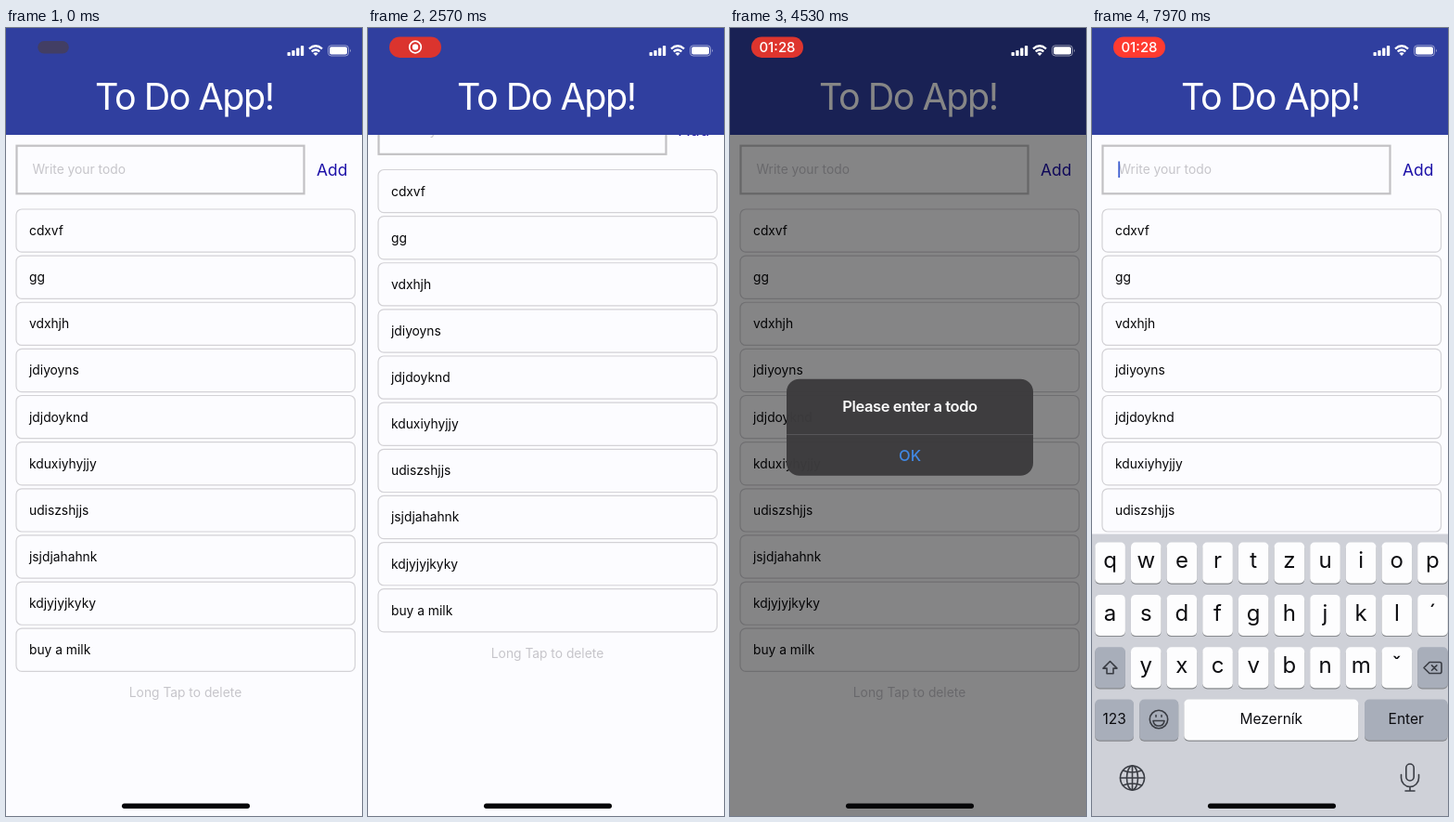
Recreate the animation shown at these times as an HTML page. Size 384 by 848 pixels, loop 8000 ms.

```html
<!DOCTYPE html>
<html lang="en">
<head>
<meta charset="utf-8">
<title>To Do App</title>
<style>
  html, body { margin: 0; width: 100%; height: 100%; overflow: hidden; background: #fcfcff; }
  svg { display: block; width: 100%; height: 100%; }
  text { font: 13.8px Inter, Roboto, sans-serif; white-space: pre; }
  .mid { text-anchor: middle; }

  .title { font-size: 39.5px; font-weight: 400; letter-spacing: -1.5px; fill: #fff; }
  .input { fill: none; stroke: #c2c1c4; stroke-width: 2.2; }
  .hint { fill: #c6c5ca; }
  .add { font-size: 17.4px; fill: #1c10a8; }
  .item { fill: none; stroke: #d3d2d6; stroke-width: 1.2; }
  .label { fill: #060608; }

  .time { font-size: 15px; font-weight: 500; fill: #fff; }
  .alert text { font-size: 16.5px; }
  .message { font-weight: 600; letter-spacing: -.4px; fill: #fff; }
  .ok { font-weight: 500; fill: #3f88e6; }
  .key { fill: #fdfdfe; }
  .grey { fill: #a8aeba; }
  .letter { font-size: 24px; fill: #0c0c10; }
  .word { font-size: 15.5px; fill: #0c0c10; }
  .icon { fill: none; stroke: #3a3d44; stroke-width: 1.6; stroke-linejoin: round; stroke-linecap: round; }
</style>
</head>
<body>
<svg viewBox="0 0 384 848" preserveAspectRatio="none">
  <rect width="384" height="848" fill="#fcfcff"/>

  <g id="content">
    <rect class="input" x="11.5" y="126.7" width="310" height="51.6"/>
    <text class="hint" x="28.5" y="157.3">Write your todo</text>
    <rect id="caret" x="28.3" y="143.5" width="1.8" height="17.5" fill="#3f5fd0"/>
    <text class="add mid" x="351.7" y="158.8">Add</text>
    <g id="items"></g>
    <text class="hint mid" x="193.5" y="720.3">Long Tap to delete</text>
  </g>

  <rect width="384" height="115" fill="#303f9f"/>
  <text class="title mid" x="192.3" y="87.8">To Do App!</text>

  <rect id="shade" width="384" height="848"/>

  <g id="alert" class="alert">
    <rect x="61" y="377.7" width="266" height="104" rx="13.8" fill="#3c3b3d"/>
    <rect x="61" y="437" width="266" height=".9" fill="#5a595c"/>
    <text class="message mid" x="194" y="413.2">Please enter a todo</text>
    <text class="ok mid" x="194" y="466.3">OK</text>
  </g>

  <g id="keyboard">
    <rect y="544" width="384" height="304" fill="#cfd1d8"/>
    <g id="keys"></g>
    <path class="icon" d="M19.5 681l-7.5 7.6h4v5.6h7v-5.6h4z"/>
    <path class="icon" d="M364 682h11q2 0 2 2v8q0 2-2 2h-11l-6-6zM366.5 685.3l5.4 5.4m0-5.4l-5.4 5.4"/>
    <g class="icon">
      <circle cx="72" cy="743.5" r="9.7"/>
      <path d="M66 745h12q-.8 5.5-6 5.5t-6-5.5zM69 739v1.8M75 739v1.8"/>
    </g>
    <g class="icon">
      <circle cx="43.5" cy="806.5" r="13"/>
      <ellipse cx="43.5" cy="806.5" rx="6" ry="13"/>
      <path d="M43.5 793.5v26M30.5 806.5h26M33.5 798.5q10 4 20 0M33.5 814.5q10-4 20 0"/>
      <rect x="338.8" y="791.5" width="8.4" height="18" rx="4.2"/>
      <path d="M333.5 803v3.5a9.5 9.5 0 0 0 19 0v-3.5M343 816v4.5M338 820.5h10"/>
    </g>
  </g>

  <g fill="#fff">
    <rect x="303.5" y="26" width="3.3" height="4" rx=".8"/>
    <rect x="308.3" y="24" width="3.3" height="6" rx=".8"/>
    <rect x="313.1" y="21.5" width="3.3" height="8.5" rx=".8"/>
    <rect x="317.9" y="19" width="3.3" height="11" rx=".8"/>
    <path d="M334 30l-2.6-2.7q2.6-2 5.2 0z"/>
    <path d="M329.7 25.4q4.3-3.7 8.6 0M327 22.3q7-6 14 0" fill="none" stroke="#fff" stroke-width="2.3"/>
    <rect x="347.5" y="18.8" width="22" height="11.2" rx="3.4" fill="none" stroke="#fff" stroke-opacity=".5"/>
    <rect x="349" y="20.3" width="19" height="8.2" rx="2"/>
    <path d="M371 22.5q1.8 1.9 0 3.8z" opacity=".6"/>
  </g>

  <g id="pill">
    <rect id="pillBody" x="23" y="9.5" width="56" height="22.4" rx="11.2"/>
    <g id="record">
      <circle cx="51" cy="20.5" r="6.3" fill="none" stroke="#fff" stroke-width="1.7"/>
      <circle cx="51" cy="20.5" r="3.2" fill="#fff"/>
    </g>
    <text id="clock" class="time mid" x="51" y="26">01:28</text>
  </g>

  <rect x="125" y="834.6" width="138" height="5.3" rx="2.65" fill="#060608"/>
</svg>

<script>
const LOOP = 8000;
const KEYBOARD_AT = 7490;
const ALERTS = [[3605, 4500], [5276, 6150]];               // shown, dismissed
const SCROLL = [[0, 0], [1000, 0], [1870, 94], [2570, -42.5], [3150, 0], [LOOP, 0]];
const TODOS = ['cdxvf', 'gg', 'vdxhjh', 'jdiyoyns', 'jdjdoyknd', 'kduxiyhyjjy',
  'udiszshjjs', 'jsjdjahahnk', 'kdjyjyjkyky', 'buy a milk'];

const el = id => document.getElementById(id);
const clamp = v => Math.min(1, Math.max(0, v));
const smooth = v => v * v * (3 - 2 * v);
const ramp = (t, start, length) => smooth(clamp((t - start) / length));
// remaining distance of a critically damped spring
const spring = (ms, rate = 0.018) => ms <= 0 ? 1 : Math.exp(-rate * ms) * (1 + rate * ms);
const mix = (a, b, p) => `rgb(${a.map((v, i) => v + (b[i] - v) * p)})`;

el('items').innerHTML = TODOS.map((todo, i) => {
  const y = 195 + 50.13 * i;
  return `<rect class="item" x="11" y="${y}" width="365.5" height="46.2" rx="6"/>
    <text class="label" x="25" y="${y + 28}">${todo}</text>`;
}).join('');

function key(x, y, width, label, kind = 'key', font = 'letter') {
  const box = `x="${x}" width="${width}" height="44" rx="5"`;
  return `<rect ${box} y="${y + 1.2}" fill="#888a8e"/><rect ${box} y="${y}" class="${kind}"/>
    <text class="${font} mid" x="${x + width / 2}" y="${y + (font === 'letter' ? 27.7 : 26.7)}">${label}</text>`;
}
const rows = ['qwertzuiop', 'asdfghjkl´', ' yxcvbnmˇ '];
el('keys').innerHTML = rows.map((row, r) => [...row].map((letter, i) =>
  key(3.3 + 38.65 * i, 553 + 56.4 * r, 32.6, letter, letter === ' ' ? 'grey' : 'key')).join('')).join('') +
  key(3.3, 722, 41.7, '123', 'grey', 'word') + key(51.3, 722, 41.9, '', 'grey', 'word') +
  key(99.3, 722, 188, 'Mezerník', 'key', 'word') + key(294, 722, 89.5, 'Enter', 'grey', 'word');

function scrollAt(t) {
  const i = SCROLL.findIndex(([time]) => time > t);
  const [t0, y0] = SCROLL[i - 1], [t1, y1] = SCROLL[i];
  return y0 + (y1 - y0) * ramp(t, t0, t1 - t0);
}

function drawAlert(t) {
  const [shown, dismissed] = ALERTS.find(([, end]) => t < end + 300) || [LOOP, LOOP];
  const left = spring(t - shown);
  const visible = (1 - left * left) * (1 - ramp(t, dismissed, 300));
  const scale = 1 + 0.2 * left;
  el('shade').setAttribute('opacity', 0.49 * visible);
  el('alert').setAttribute('opacity', visible);
  el('alert').setAttribute('transform', `translate(194 429.7) scale(${scale}) translate(-194 -429.7)`);
}

function drawPill(t) {
  const grown = ramp(t, 0, 350);
  const scale = 0.6 + 0.4 * grown;
  const pulse = 0.5 - 0.5 * Math.cos((t - 1495) / 2150 * 2 * Math.PI);
  const glow = mix([255, 59, 48], [219, 52, 46], pulse);
  const showTime = ramp(t, 3000, 250);
  el('pillBody').setAttribute('fill', grown < 1 ? `color-mix(in srgb, #423e64, ${glow} ${grown * 100}%)` : glow);
  el('pillBody').style.fill = el('pillBody').getAttribute('fill');
  el('pill').setAttribute('transform', `translate(51 20.7) scale(${scale}) translate(-51 -20.7)`);
  el('record').setAttribute('opacity', grown * (1 - showTime));
  el('clock').setAttribute('opacity', showTime);
}

function draw() {
  const t = performance.now() % LOOP;
  el('content').setAttribute('transform', `translate(0 ${scrollAt(t)})`);
  el('keyboard').setAttribute('transform', `translate(0 ${306 * spring(t - KEYBOARD_AT)})`);
  el('caret').setAttribute('opacity', t > KEYBOARD_AT ? 1 : 0);
  drawAlert(t);
  drawPill(t);
  requestAnimationFrame(draw);
}
draw();
</script>
</body>
</html>
```
